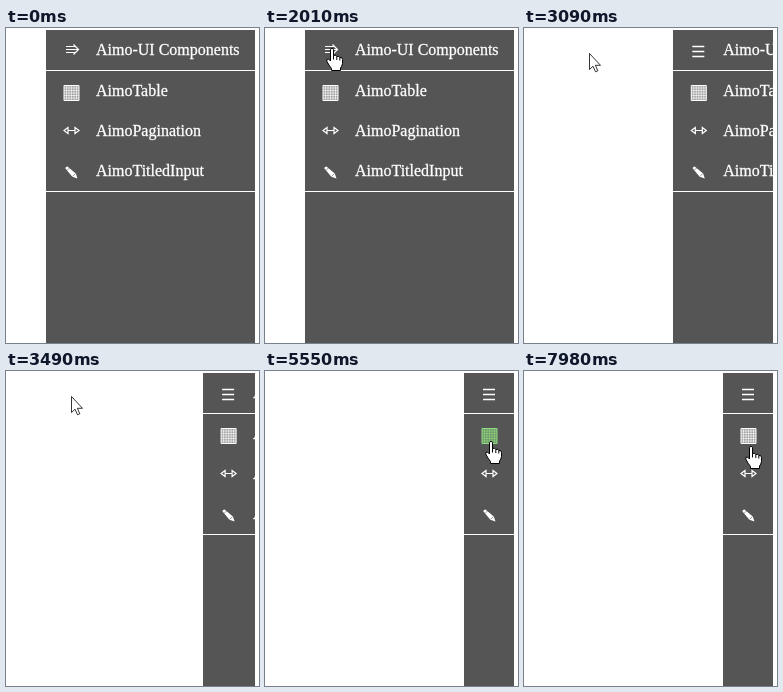
Recreate the animation shown at these times as an HTML page. Size 253 by 315 pixels, loop 8000 ms.

```html
<!DOCTYPE html>
<html lang="en">
<head>
<meta charset="utf-8">
<title>Collapsing side menu</title>
<style>
  html, body { margin: 0; width: 100%; height: 100%; overflow: hidden; background: #fff; }
  body > svg { display: block; width: 253px; height: 315px; }
  text {
    font: 16px "Liberation Serif", "Times New Roman", serif;
    fill: #fff;
    stroke: #fff;
    stroke-width: .3px;
  }

  .panel, .cursor, .hand, .arrow, .icon, .open, .closed {
    animation: 8s linear infinite;
  }
  .hand, .arrow, .icon, .open, .closed { animation-timing-function: step-end; }

  .panel { animation-name: slide; }
  @keyframes slide {
    0% { transform: none; }
    28.75% { transform: none; animation-timing-function: ease-in-out; }
    44.9%, 100% { transform: translateX(159px); }
  }

  /* Header symbol */
  .open { animation-name: open; }
  .closed { animation-name: closed; }
  @keyframes open { 0% { opacity: 1; } 30.125%, 100% { opacity: 0; } }
  @keyframes closed { 0% { opacity: 0; } 30.125%, 100% { opacity: 1; } }

  /* Hover tint */
  .icon { color: #fff; }
  .table { animation-name: table; }
  .pages { animation-name: pages; }
  .pencil { animation-name: pencil; }
  @keyframes table {
    0%, 70.3%, 100% { color: #fff; }
    56.5% { color: #90dc80; }
  }
  @keyframes pages {
    0%, 84.1%, 98.2%, 100% { color: #fff; }
    72%, 96.75% { color: #90dc80; }
  }
  @keyframes pencil {
    0%, 94.8%, 100% { color: #fff; }
    85.4% { color: #90dc80; }
  }

  .cursor { animation-name: move; }
  @keyframes move {
    0%, 17.37% { transform: translate(-40px, 90px); }
    17.375% { transform: translate(0, 81px); animation-timing-function: ease-out; }
    24.4% { transform: translate(67px, 21px); }
    25.12%, 28.37% { transform: translate(67px, 20px); }
    28.375%, 30.12% { transform: translate(66px, 22px); }
    30.125%, 44.5% { transform: translate(65px, 25px); }
    47.875%, 52.25% { transform: translate(170px, 52px); }
    58.75% { transform: translate(224px, 62px); }
    62.5% { transform: translate(224px, 65px); }
    69.375%, 70% { transform: translate(226px, 70px); }
    72.75% { transform: translate(225px, 105px); }
    83.375% { transform: translate(224px, 116px); }
    86.75%, 93.75% { transform: translate(224px, 149px); }
    99.75%, 100% { transform: translate(227px, 75px); }
  }

  .hand { animation-name: hand; }
  .arrow { animation-name: arrow; }
  @keyframes hand {
    0%, 33.6% { opacity: 0; }
    21.6%, 55.75%, 100% { opacity: 1; }
  }
  @keyframes arrow {
    0%, 33.6% { opacity: 1; }
    21.6%, 55.75%, 100% { opacity: 0; }
  }
</style>
</head>
<body>
<svg viewBox="0 0 253 315">
  <svg x="40" y="2" width="209" height="313" viewBox="40 2 209 313">
    <g class="panel">
      <path d="M40 2h209v313H40z" fill="#555"/>
      <path d="M40 42h209v1H40zM40 163h209v1H40z" fill="#fff"/>

      <g fill="none" stroke="#fff">
        <path class="open" stroke-width="1.2" d="M60 18.5h9.5M60 21.5h12M60 24.5h9.5M67.5 16.5l5 5l-5 5"/>
        <path class="closed" stroke-width="1.4" d="M59 18.5h12M59 23.5h12M59 28.5h12"/>
      </g>

      <g class="icon table" fill="none" stroke="currentColor">
        <path d="M58 57.5h15v15h-15z" fill="currentColor" fill-opacity=".45"/>
        <path stroke-opacity=".6" d="M60.5 57v15M63 57v15M65.5 57v15M68 57v15M70.5 57v15M58 60h15M58 62.5h15M58 65h15M58 67.5h15M58 70h15"/>
      </g>
      <path class="icon pages" fill="none" stroke="currentColor" stroke-width="1.2"
        d="M62 99.5L58 102.5L62 105.5ZM69 99.5L73 102.5L69 105.5ZM62 102.5h7"/>
      <g class="icon pencil" fill="currentColor">
        <path d="M59.3 140.3Q59.5 138.5 61.5 138.5L69.8 145.5L71.5 150.5L66.3 148.8Z"/>
        <path d="M61.1 142.3l2.4-2.4M66.8 148.3l2.6-2.8" stroke="#555" stroke-width=".6"/>
      </g>

      <text x="90" y="27">Aimo-UI Components</text>
      <text x="90" y="68">AimoTable</text>
      <text x="90" y="108">AimoPagination</text>
      <text x="90" y="148">AimoTitledInput</text>
    </g>
  </svg>

  <g class="cursor" fill="#fff" stroke="#000" stroke-linejoin="round">
    <path class="arrow" stroke-width=".8" d="M.5.5V16.5L4 13.2L6.5 18.8L8.8 17.8L6.4 12.3H11.5Z"/>
    <g class="hand">
      <path d="M-1.5 13V1.5Q-1.5.5 0 .5T1.5 1.5V7.5Q4.5 6.5 4.8 8.5Q7.6 7.5 7.8 9.5Q10.5 9 10.5 11.5V15.5Q10 18.5 8.5 20V22.5H-.5V20.5Q-3 17.5-5.3 13Q-5.5 10.8-3.5 11.2Q-2.2 11.6-1.5 13Z"/>
      <path fill="none" d="M1.5 7.5v4M4.8 8.5v3.5M7.8 9.5v3"/>
    </g>
  </g>
</svg>
</body>
</html>
```
